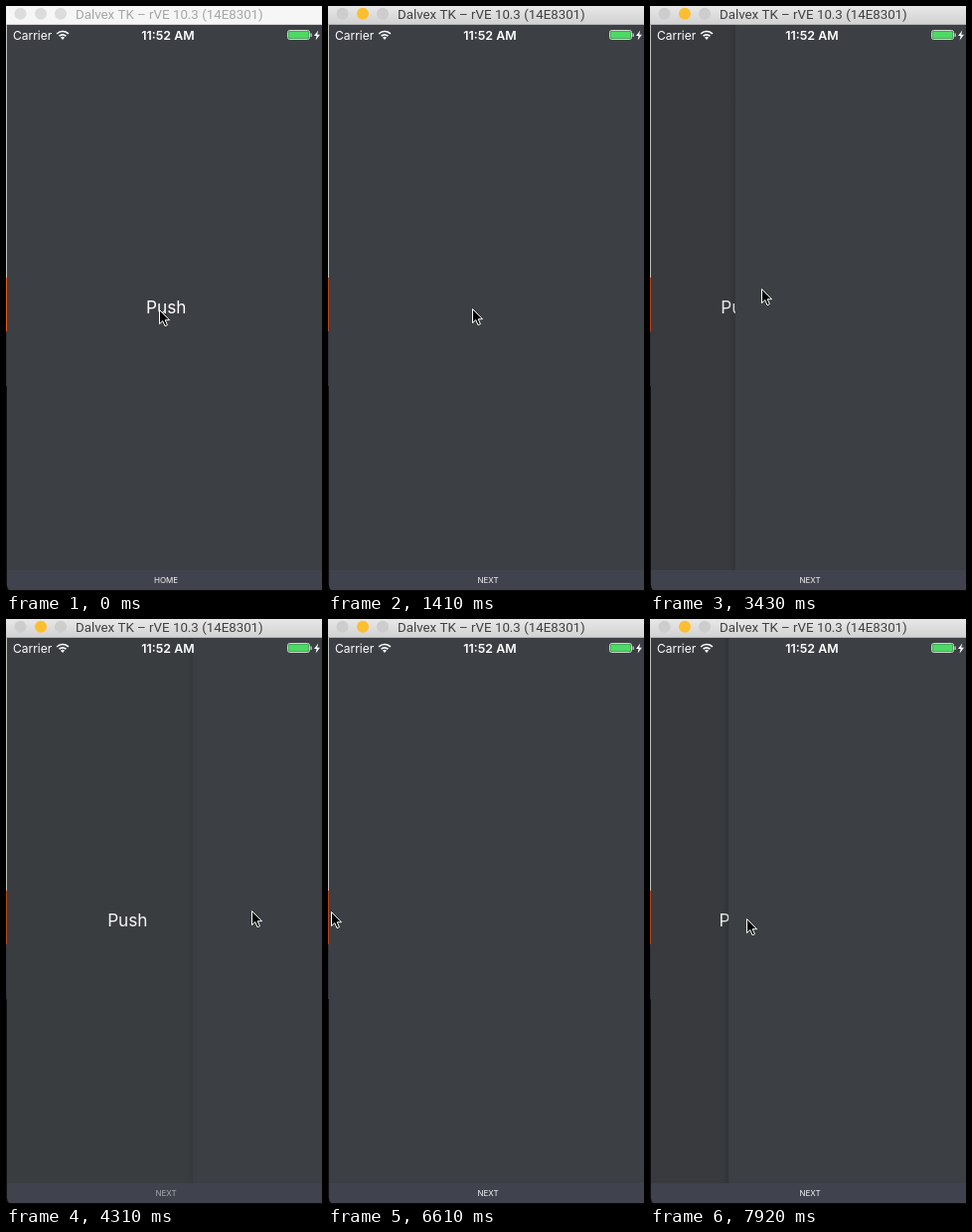
These frames come from a looping animation (318 px wide and 588 px high, 8 s). An HTML page with a canvas:

```html
<!DOCTYPE html>
<html>
<head>
<meta charset="utf-8">
<style>
  html, body { margin: 0; width: 100%; height: 100%; overflow: hidden; background: #000; }
  canvas { display: block; }
</style>
</head>
<body>
<canvas id="stage" width="318" height="588"></canvas>
<script>
const ctx = document.getElementById('stage').getContext('2d');
const W = 318, LOOP = 8000;
const TICK = 87.9;      // the screen is refreshed once per tick
const GRIP = 17;        // distance from the dragged edge to the pointer
const LAG = 0.5;        // the dragged edge trails the pointer by this many ticks
const SCREEN = '#3c3f43';

const ease = p => p * p * (3 - 2 * p);

// Each move eases from wherever the last one ended: { from, to } in ticks.
function follow(value, moves, tick) {
  for (const { from, to, end } of moves) {
    if (tick <= from) break;
    const p = ease(Math.min(1, (tick - from) / (to - from)));
    value = value.map((v, i) => v + (end[i] - v) * p);
  }
  return value;
}

const pointerMoves = [
  { from: 14.6, to: 24, end: [6, 280] },    // to the left border
  { from: 31, to: 45, end: [181, 287] },    // slow drag
  { from: 47.9, to: 50, end: [304, 298] },  // flick
  { from: 50, to: 52, end: [270, 287] },
  { from: 57, to: 63, end: [157, 306] },    // back to the button
  { from: 69, to: 75, end: [3, 294] },
  { from: 80, to: 90, end: [97, 301] }      // second drag
];
const edgeMoves = [
  { from: 5, to: 8, end: [0] },             // push
  { from: 48, to: 49, end: [189] },
  { from: 49, to: 52, end: [W] },           // pop after the flick
  { from: 65, to: 68, end: [0] }            // push
];

const pointerAt = tick => follow([154, 305], pointerMoves, tick);

function edgeAt(tick) {
  const dragging = (tick > 31 && tick <= 49) || tick > 80;
  return dragging ? Math.max(0, pointerAt(tick - LAG)[0] - GRIP) : follow([W], edgeMoves, tick)[0];
}

function rect(x, y, w, h, fill) {
  ctx.fillStyle = fill;
  ctx.fillRect(x, y, w, h);
}

function text(str, x, y, font, fill, align = 'left') {
  ctx.font = font;
  ctx.fillStyle = fill;
  ctx.textAlign = align;
  ctx.fillText(str, x, y);
}

function gradient(x0, y0, x1, y1, from, to) {
  const g = ctx.createLinearGradient(x0, y0, x1, y1);
  g.addColorStop(0, from);
  g.addColorStop(1, to);
  return g;
}

function titleBar(active) {
  rect(0, 0, W, 18, active ? gradient(0, 0, 0, 18, '#e8e8e8', '#d2d2d2') : '#f6f6f6');
  rect(0, 18, W, 1, active ? '#b4b4b4' : '#d6d6d6');
  for (const x of [14.5, 35, 55]) {
    ctx.beginPath();
    ctx.arc(x, 7.8, 6, 0, 7);
    ctx.fillStyle = !active ? '#dcdcdc' : x === 35 ? '#fdbe2f' : '#cdcdcd';
    ctx.fill();
  }
  text('Dalvex TK – rVE 10.3 (14E8301)', 70, 13, '13.3px Roboto, sans-serif', active ? '#404040' : '#a6a6a6');
}

function statusBar() {
  text('Carrier', 7, 34, '12px Inter, sans-serif', '#fff');
  text('11:52 AM', 163, 34, '600 12.4px Inter, sans-serif', '#fff', 'center');

  const fan = [-Math.PI * 0.76, -Math.PI * 0.24];
  ctx.strokeStyle = '#fff';
  ctx.lineWidth = 1.7;
  for (const r of [4.7, 8]) {
    ctx.beginPath();
    ctx.arc(57, 33.5, r, ...fan);
    ctx.stroke();
  }
  ctx.fillStyle = '#fff';
  ctx.beginPath();
  ctx.moveTo(57, 34);
  ctx.arc(57, 33.5, 2.7, ...fan);
  ctx.fill();

  ctx.lineWidth = 1;
  ctx.strokeStyle = '#cfd6d0';
  ctx.beginPath();
  ctx.roundRect(283.5, 24.5, 22, 9, 2);
  ctx.stroke();
  rect(284.3, 25.3, 20.4, 7.4, '#4cd964');
  rect(306.5, 27.5, 1.3, 3.5, '#c9cbce');
  ctx.fillStyle = '#fff';
  ctx.fill(new Path2D('M314.2 24.5L310 30h2.6l-1 4.5L316 28.7h-2.8z'));
}

function screens(edge) {
  const covered = 1 - edge / W;
  rect(1, 19, W, 548, SCREEN);
  text('Push', 161.2 - 0.3 * (W - edge), 309, '17.2px Inter, sans-serif', '#fff', 'center');
  if (covered <= 0) return;
  rect(1, 19, edge - 1, 548, `rgba(0,0,0,${0.1 * covered})`);
  rect(edge - 7, 19, 7, 548, gradient(edge - 7, 0, edge, 0, 'rgba(0,0,0,0)', `rgba(0,0,0,${0.15 * covered})`));
  rect(Math.max(edge, 1), 19, W, 548, SCREEN);
}

function tabBar(tick) {
  rect(1, 567, W, 20, '#40434e');
  rect(0, 587, W, 1, '#0a0a0a');
  const home = tick < 10 || (tick >= 50 && tick < 70);
  const fading = tick >= 49 && tick < 52;
  text(home ? 'HOME' : 'NEXT', 161, 580, '8px Inter, sans-serif', fading ? '#a9abb0' : '#f5f5f6', 'center');
}

function windowEdge(active) {
  rect(0, 19, 1, 254, '#c4c1bd');
  rect(0, 273, 1, 54, active ? '#b5451c' : '#e8551c');
  rect(0, 327, 1, 55, '#34343c');
  rect(0, 382, 1, 206, '#111');
  ctx.fillStyle = '#050505';
  ctx.fill(new Path2D('M0 582H1Q1 588 7 588H0z'));
}

const arrow = new Path2D('M.5 .5V14.6L3.8 11.5L6 16.7L8.4 15.7L6.2 10.7H10.5z');
function pointer([x, y]) {
  ctx.save();
  ctx.translate(Math.round(x), Math.round(y));
  ctx.fillStyle = '#000';
  ctx.fill(arrow);
  ctx.strokeStyle = '#fff';
  ctx.lineWidth = 1;
  ctx.stroke(arrow);
  ctx.restore();
}

function draw(now) {
  const tick = Math.floor((now % LOOP + 8) / TICK);
  const active = tick >= 6;
  screens(edgeAt(tick));
  statusBar();
  tabBar(tick);
  windowEdge(active);
  titleBar(active);
  pointer(pointerAt(tick));
  requestAnimationFrame(draw);
}
requestAnimationFrame(draw);
</script>
</body>
</html>
```
